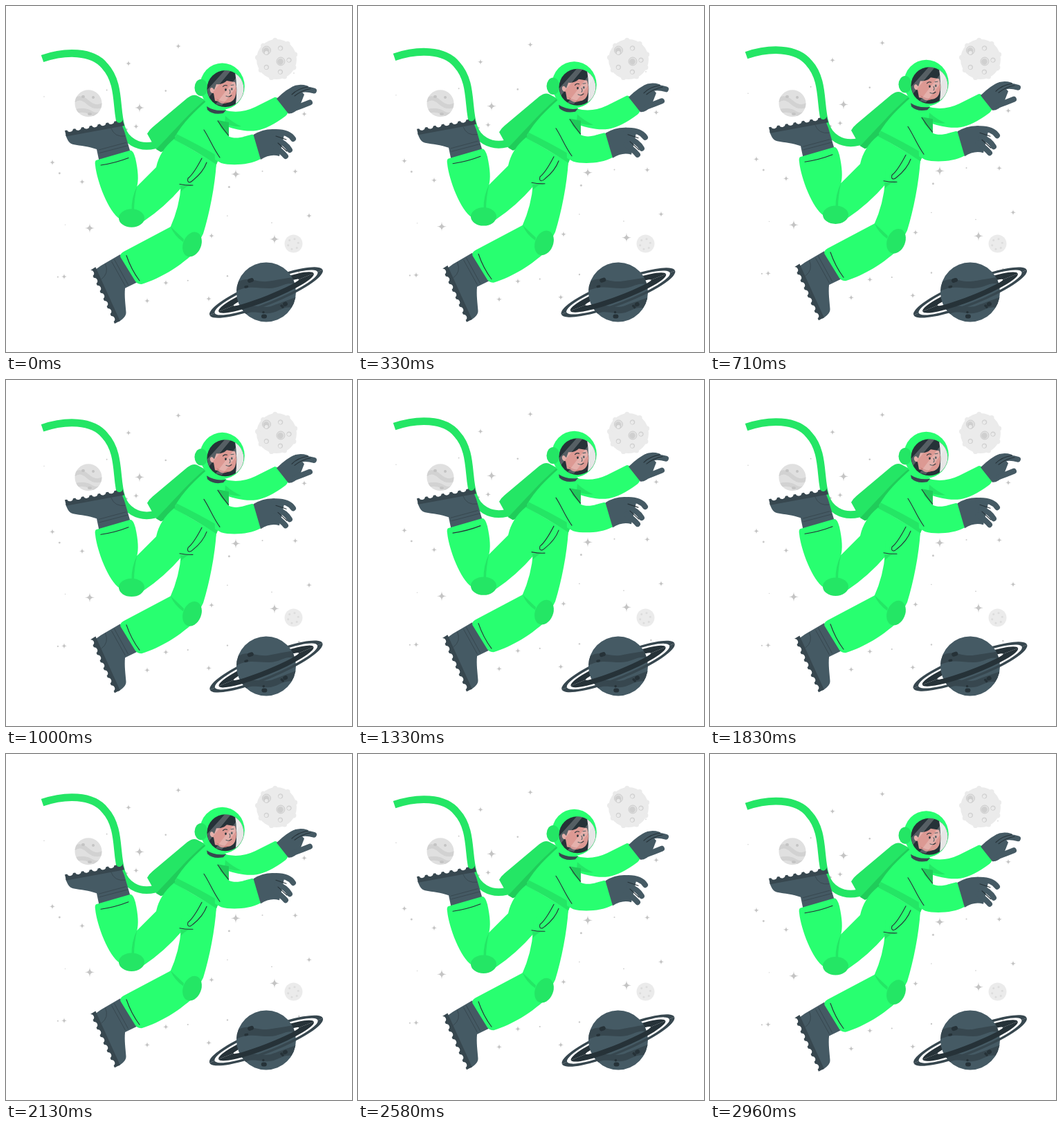
An HTML page that plays this animation: 500x500 px, repeating every 3 s.

```html
<!DOCTYPE html>
<html lang="en">
<head>
<meta charset="utf-8">
<title>Floating astronaut</title>
<style>
  html, body { margin: 0; width: 100%; height: 100%; overflow: hidden; background: #fff; }
  svg { display: block; width: 100%; height: 100%; }
  .g { fill: #28ff70; }
  .g2 { fill: #24e665; }
  .g3 { fill: #20cc5a; }
  .slate { fill: #455a64; }
  .dark { fill: #37474f; }
  .ink { fill: #263238; }
  .line, .thin, .finger { fill: none; stroke: #263238; stroke-width: 1.1; stroke-linecap: round; stroke-linejoin: round; }
  .thin { stroke: #37474f; stroke-width: .9; }
  .finger { stroke: #455a64; stroke-width: 8; }
</style>
</head>
<body>
<svg viewBox="0 0 500 500">
  <defs>
    <clipPath id="globe"><circle cx="376" cy="413.5" r="43"/></clipPath>
    <clipPath id="pale"><circle cx="119" cy="140.7" r="19.5"/></clipPath>
    <clipPath id="visor"><ellipse cx="317" cy="119.5" rx="26.5" ry="26.5"/></clipPath>
    <g id="boot">
      <path class="slate" d="M86 186L167 171 171 181 180 212 135 226 131 207C120 203 108 202 97 200 91 199 88 192 86 186Z"/>
      <path id="sole" class="dark"/>
      <path class="thin" d="M152 177Q157 190 172 188M134 208L173 197.5M135 212.5L175 202"/>
    </g>
  </defs>

  <g id="stars" fill="#c4c4c4"></g>
  <g id="moon"></g>

  <g clip-path="url(#pale)">
    <path fill="#e0e0e0" d="M99 120H140V162H99Z"/>
    <path fill="none" stroke="#d2d2d2" stroke-width="6" d="M98 137Q107 129 118 139T140 143M98 153Q112 148 122 154T140 154"/>
    <path fill="none" stroke="#c4c4c4" stroke-width="4" stroke-linecap="round" d="M111 131h1M126 132h.1M120 156h2"/>
  </g>

  <g id="saturn">
    <g id="back" transform="translate(376 414) rotate(-21.8)"></g>
    <g clip-path="url(#globe)">
      <path class="slate" d="M333 370H420V457H333Z"/>
      <path class="dark" d="M333 400C352 388 362 402 384 397T420 391V402C402 398 398 408 380 408S350 403 331 413ZM338 438C356 427 372 440 388 432T421 420L414 436C398 433 392 446 374 444S350 441 344 448Z"/>
      <path fill="none" stroke="#263238" stroke-width="6" stroke-linecap="round" d="M352 397l3-1M403 431l1-.5M372 448.500h2"/>
      <path fill="none" stroke="#263238" stroke-width="3.500" stroke-linecap="round" d="M346 406l2.500-.5M372 442.500v.1M398 433l2 2"/>
    </g>
    <g id="front" transform="translate(376 414) rotate(-21.8)"></g>
  </g>

  <g id="astronaut">
    <path fill="none" stroke="#24e665" stroke-width="10.8" d="M52.5 76C85 65 125 64 143 87 166 112 158 150 167 176 172 193 190 207 215 201"/>

    <!-- backpack -->
    <path class="g2" d="M204 184.5Q207 179 212 175L262 133Q270 127 276 129.5L290 137 246 188 224 211 216 206Z"/>
    <path class="g3" d="M224 211L217 207C237 187 261 158 286 137L291 140 246 190 232 208Z"/>

    <!-- legs -->
    <use href="#boot"/>
    <use href="#boot" transform="translate(157 459) rotate(-104) translate(-85 -180)"/>
    <path class="g" d="M243 192Q222 209 217 233L189 261 164 304 182 318 199 311Q229 291 254 262L300 250 304 228Z"/>
    <path class="g" d="M130 223L180 208.500Q184 209 187 220C191 238 192 252 189 262L183 298 165 308C148 298 131 252 129 230Q128 225 130 223Z"/>
    <path class="g2" d="M189.500 260Q181 277 181.500 296H185Q185 279 189.500 260Z"/>
    <ellipse class="g2" cx="181.500" cy="306.500" rx="18.500" ry="13.200"/>
    <path class="line" d="M137 230Q158 227 177 219.500"/>
    <path class="g" d="M254 240L304 227C302 260 294 300 285 329L270 358 237 321Q251 290 253 258Z"/>
    <path class="g" d="M238 319L270 342 266 362C250 376 225 393 196 402Q190 402 187 398L165.500 363Q164 358 170 355Z"/>
    <path class="g2" d="M238 319L257 337 256 341Q243 332 238 319ZM252 260L271 258Q261 259 253 268Z"/>
    <ellipse class="g2" cx="269" cy="344.500" rx="13" ry="18.500" transform="rotate(22 269 344.500)"/>
    <path class="line" d="M174 360.500Q181 381 193 397M283 220Q271 243 263 249C261 256 266 256 270 252Q285 240 290 226M251 257.500Q261 259.500 270 259"/>

    <!-- torso and arms -->
    <path class="g" d="M291 136C272 153 256 168 244 189L304 229 322 189V166L318 150Z"/>
    <path class="g2" d="M246.500 185Q279 201 308 218L304 229Q273 209 243 193Z"/>
    <path class="g" d="M314 150Q337 157 360 146L388 132Q391 131 394 135L407 151Q408.500 155 404 159 380 177 362 180C346 182 331 178 319 174Z"/>
    <path class="g2" d="M317 159Q327 168 340 174 325 175 316 169Z"/>
    <path class="g3" d="M306 165L322 168V189L310 175Z"/>
    <path class="g" d="M300 169L321 188C333 194 345 188 356 185.500L360 188 368 221C352 230 325 231 311 227L302 222Z"/>
    <path class="line" d="M286 179C294 191 299 205 309 219M306 166Q314 178 321.500 187"/>

    <!-- gloves -->
    <path class="slate" d="M391 134Q406 119 419 114.500L431 128 424 146Q417 156 408 155.500Z"/>
    <path class="finger" d="M416 120Q424 116 434 119M416 124Q430 118 445 122.500M417 148Q428 144 439 139.500"/>
    <path class="slate" d="M357.500 186Q372 177 388 178L402 186 395 217Q382 213 368 222Z"/>
    <path class="finger" d="M387 182Q408 181 415 192M392 194Q404 198 410 208M388 203Q398 210 404 217"/>
    <path class="line" d="M413 128Q422 119 436 117M417 130Q427 122 440 119.500M390 188L405 193M393 198L406 210"/>

    <!-- helmet -->
    <path class="dark" d="M290 145Q302 153 318 150.500L314 155Q299 158 291 150Z"/>
    <ellipse class="g" cx="312.500" cy="116" rx="32.300" ry="33.500"/>
    <ellipse class="g2" cx="282" cy="118" rx="9.500" ry="12.200"/>
    <g clip-path="url(#visor)">
      <path class="ink" d="M288 90H346V148H288Z"/>
      <path fill="#dc9993" d="M304 113Q313 114 319 108L331 110Q335 122 331 132C328 139 321 141 314 139L302 137 300 126C294 127 293 117 298 118L301 121Z"/>
      <path fill="#c47b78" d="M304 134Q312 139 322 139 310 145 304 134Z"/>
      <path fill="none" stroke="#263238" stroke-width="2.500" stroke-linecap="round" d="M317.500 120.500v1M326.300 119.500v1"/>
      <path class="line" d="M313.500 116.500Q316 113.500 319.500 115M325 114.500L329 114M323 121Q325 125 323 126.500M318 130Q322 132.500 326 129"/>
      <path fill="#e6e6e6" d="M330 90Q336 119 331 148H346V90Z"/>
      <path fill="#fff" opacity=".22" d="M291 121L317 92H326L293 132ZM303 142L336 99 343 104 312 144Z"/>
    </g>
  </g>
</svg>
<script>
const $ = id => document.getElementById(id);
const TAU = 2 * Math.PI;
const path = (d, fill) => `<path d="${d}" fill="${fill}"/>`;
const circle = (x, y, r, fill, extra = '') => `<circle cx="${x}" cy="${y}" r="${r}" fill="${fill}" ${extra}/>`;
// Calls make(x, y, i) for n points spread evenly on a circle
const around = (n, cx, cy, r, start, make) => Array.from({ length: n }, (_, i) => {
  const a = start + i * TAU / n;
  return make(cx + r * Math.cos(a), cy + r * Math.sin(a), i);
}).join('');

$('sole').setAttribute('d', 'M85 180' + 'l3.2-.6a4.6 4.6 0 0 0 8.7-1.6'.repeat(7) + 'L171 173 87 188.5Z');

const star = r => ([x, y]) =>
  path(`M${x} ${y - r}Q${x} ${y} ${x + r} ${y}Q${x} ${y} ${x} ${y + r}Q${x} ${y} ${x - r} ${y}Q${x} ${y} ${x} ${y - r}`, '#c4c4c4');
const big = [[193, 147], [121, 321], [332, 243], [388, 337]];
const small = [[249, 58], [177, 83], [188, 174], [67, 226], [110, 254], [418, 239], [438, 303],
  [297, 332], [84, 391], [231, 400], [204, 426], [293, 423], [431, 156]];

// Specks: one per cell of a loose grid
let seed = 7;
const rand = () => (seed = seed * 16807 % 2147483647) / 2147483647;
let specks = '';
for (let y = 85; y < 430; y += 70) {
  for (let x = 55; x < 420; x += 78) {
    specks += circle(x + 60 * rand(), y + 50 * rand(), .6 + 1.2 * rand() ** 2, '#c8c8c8');
  }
}
$('stars').innerHTML = big.map(star(7)).join('') + small.map(star(4.5)).join('') + specks;

// Moons: rim lumps, two deep craters, shallow ones around them
const crater = (r, floor) => (x, y) =>
  circle(x, y, r, '#e0e0e0', 'stroke="#c7c7c7" stroke-width=".8"') + circle(x - .5, y + .5, r * .7, floor);
const deep = crater(6, '#cfcfcf');
$('moon').innerHTML = circle(391, 77, 29, '#ebebeb') +
  around(9, 391, 77, 27.5, -1.65, (x, y) => circle(x, y, 3.6, '#ebebeb')) +
  deep(376.5, 64) + deep(397, 80) +
  around(5, 391, 78, 18, -1.25, crater(3.2, '#ebebeb')) +
  circle(415.5, 343.5, 13, '#ebebeb') +
  around(6, 415, 344, 7.5, .8, (x, y) => circle(x, y, 1.5, '#dcdcdc'));

// Half of a flat ring; side 1 is the near half
const half = (a, b, c, d, side, fill) =>
  path(`M${-a} 0A${a} ${b} 0 0 ${1 - side} ${a} 0H${c}A${c} ${d} 0 0 ${side} ${-c} 0Z`, fill);
['back', 'front'].forEach((id, side) => {
  $(id).innerHTML = half(88, 18, 80, 14.5, side, '#37474f') + half(74, 12, 51, 4.5, side, '#263238');
});

const triangle = turns => Math.asin(Math.sin(TAU * turns)) * 4 / TAU;

function frame() {
  const p = performance.now() % 3000 / 3000;
  const shift = `translate(0 ${-10 * (1 - Math.abs(1 - 2 * p))})`;
  $('astronaut').setAttribute('transform', shift);
  $('stars').setAttribute('transform', shift);
  $('saturn').setAttribute('transform', `rotate(${triangle(2 * p)} 376 414)`);
  requestAnimationFrame(frame);
}
frame();
</script>
</body>
</html>
```
